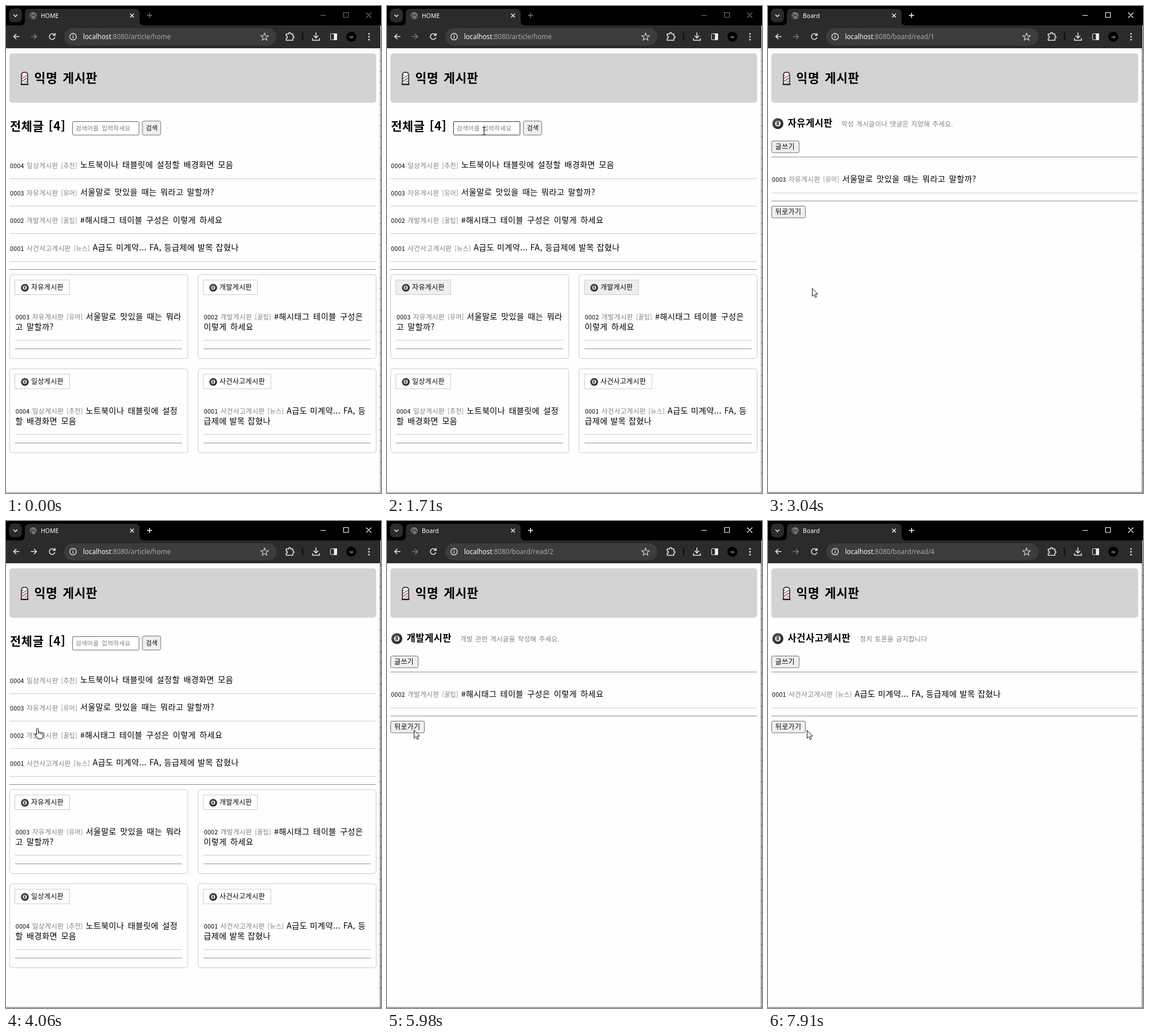
Write an HTML page that moves like this. It is 657 px wide and 853 px high and loops after 8000 ms.

```html
<!DOCTYPE html>
<html lang="ko">
<head>
<meta charset="utf-8">
<title>익명 게시판</title>
<style>
html, body { margin: 0; width: 100%; height: 100%; overflow: hidden; background: #fefefe; }
svg { display: block; width: 100vw; height: 100vh; }
text { font-family: "Noto Sans CJK KR", "Noto Sans CJK", sans-serif; font-weight: 350; letter-spacing: .03em; fill: #000; white-space: pre; }
.ui { font-family: "Noto Sans", "Open Sans", sans-serif; font-weight: 400; letter-spacing: 0; fill: #fff; }
.ico { fill: none; stroke: #e3e3e3; stroke-width: 1.6; }
.gray { fill: #808080; }
.bold { font-weight: 700; }
</style>
</head>
<body>
<svg id="stage" viewBox="0 0 657 853" preserveAspectRatio="none"></svg>
<script>
const LOOP = 8000;
const stage = document.getElementById('stage');

const text = (x, y, size, str, cls = '', ws = 0) =>
  `<text x="${x}" y="${y}" font-size="${size}" class="${cls}" word-spacing="${ws}">${str}</text>`;
const rect = (x, y, w, h, fill, stroke = 'none', r = 0, cls = '') =>
  `<rect x="${x}" y="${y}" width="${w}" height="${h}" rx="${r}" fill="${fill}" stroke="${stroke}" class="${cls}"/>`;
const circle = (x, y, r, fill, extra = '') => `<circle cx="${x}" cy="${y}" r="${r}" fill="${fill}" ${extra}/>`;
const path = (d, cls = 'ico', extra = '') => `<path d="${d}" class="${cls}" ${extra}/>`;
const rule = (x, y, w, color) => rect(x, y, w, 1, color);

const posts = {
  4: { board: '일상게시판', tag: '[추천]', title: '노트북이나 태블릿에 설정할 배경화면 모음', wrap: ['노트북이나 태블릿에 설정', '할 배경화면 모음'], ws: 2 },
  3: { board: '자유게시판', tag: '[유머]', title: '서울말로 맛있을 때는 뭐라고 말할까?', wrap: ['서울말로 맛있을 때는 뭐라', '고 말할까?'], ws: 2 },
  2: { board: '개발게시판', tag: '[꿀팁]', title: '#해시태그 테이블 구성은 이렇게 하세요', wrap: ['#해시태그 테이블 구성은', '이렇게 하세요'], ws: 2 },
  1: { board: '사건사고게시판', tag: '[뉴스]', title: 'A급도 미계약... FA, 등급제에 발목 잡혔나', wrap: ['A급도 미계약... FA, 등', '급제에 발목 잡혔나'], ws: 0.4 }
};

function postLine(x, y, id, wrapped) {
  const p = posts[id];
  const shift = p.board.length > 5 ? 22 : 0;
  const [first, second] = wrapped ? p.wrap : [p.title];
  return text(x, y, 10.6, '000' + id) +
    text(x + 29, y, 11.7, p.board, 'gray') +
    text(x + 89.5 + shift, y, 10.8, p.tag, 'gray') +
    text(x + 123 + shift, y - 0.6, 14.2, first, '', p.ws) +
    (second ? text(x - 0.5, y + 17.4, 14.2, second, '', p.ws) : '');
}

function ball(x, y, r) {
  return circle(x, y, r, '#2b2b2b') +
    circle(x - r * 0.1, y - r * 0.1, r * 0.78, '#484848') +
    circle(x, y, r * 0.5, '#f4f4f4') +
    `<text x="${x}" y="${y + r * 0.33}" font-size="${r * 0.9}" class="bold" text-anchor="middle">8</text>`;
}

function card(x, y, id, btnW, row) {
  const dx = x > 300 ? 9.5 : 9;
  return rect(x, y, 312, 147, 'none', '#ccc', 4) +
    rect(x + dx, y + 9.5, btnW, 25.5, '#fff', '#ccc', 0, 'link' + row) +
    ball(x + 26.5, y + 23, 6.8) +
    text(x + 37.5, y + 26.8, 12, posts[id].board) +
    postLine(x + 10.2, y + 78.8, id, true) +
    rule(x + dx, y + 114.5, 293, '#ccc') +
    rule(x + dx, y + 129.5, 293, '#969696');
}

const button = (x, y, w, h, label, size = 12) =>
  rect(x, y, w, h, '#efefef', '#707070', 2.5) + text(x + 6.3, y + h / 2 + 4.3, size, label);

function homePage() {
  let s = text(7, 218, 20.9, '전체글 [4]', 'bold', 1.4) +
    '<rect id="field" x="116.5" y="202.5" width="116.5" height="23.5" rx="1.5" fill="#fff"/>' +
    text(122, 217.8, 10.7, '검색어를 입력하세요', 'gray', 1.8) +
    button(239, 201.5, 32, 24.5, '검색', 10.8);
  [4, 3, 2, 1].forEach((id, i) => {
    const y = 283.6 + i * 48.4;
    s += postLine(7, y, id) + rule(6, Math.round(y + 18), 642, '#ccc');
  });
  return s + rule(6, 461, 642, '#8d8d8d') +
    card(6.5, 470.5, 3, 96, 1) + card(336.5, 470.5, 2, 94.5, 1) +
    card(6.5, 635.5, 4, 96, 2) + card(336.5, 635.5, 1, 118, 2);
}

function boardPage(id, note) {
  const name = posts[id].board;
  return ball(17.3, 206, 9.6) +
    text(34.5, 211, 16.6, name, 'bold') +
    text(name.length > 5 ? 161 : 128.5, 211, 11.5, note, 'gray', 0.8) +
    button(6.5, 236.5, 48, 20.5, '글쓰기') + rule(6, 264, 642, '#8d8d8d') +
    postLine(7, 308.4, id) + rule(6, 327, 642, '#ccc') + rule(6, 341, 642, '#8d8d8d') +
    button(6.5, 350.5, 59, 20.5, '뒤로가기');
}

function pole() {
  return '<clipPath id="glass"><path d="M28 121h9.500v13h-9.500z"/></clipPath>' +
    path('M27 137V121q0-5 5.500-5t5.500 5v16z', '', 'fill="#f7f7f7" stroke="#222" stroke-width="1.6"') +
    `<g clip-path="url(#glass)">${[0, 1, 2, 3].map(i =>
      path(`M26 ${123 + i * 5}l13 -8`, '', `stroke="${i % 2 ? '#e05050' : '#3562cf'}" stroke-width="1.5"`)).join('')}</g>` +
    rect(25.5, 136, 14, 2.5, '#222', 'none', 1);
}

function chrome() {
  const star = Array.from({ length: 10 }, (_, i) => {
    const a = i * Math.PI / 5 - Math.PI / 2, r = i % 2 ? 3 : 6.8;
    return (453 + r * Math.cos(a)).toFixed(1) + ' ' + (54.3 + r * Math.sin(a)).toFixed(1);
  }).join('L');
  return rect(0, 0, 657, 34, '#000') + rect(0, 34, 656, 40, '#2b2b2b') +
    rect(5, 4.5, 23, 24, '#2b2b2b', 'none', 8) + path('M13 15l3.500 3.500 3.500-3.500') +
    path('M25 34q8 0 8-8V13q0-8 8-8H226q8 0 8 8V26q0 8 8 8z', '', 'fill="#2b2b2b"') +
    circle(47.5, 17, 6.2, '#74777b') + path('M43 14q3 4 5 2t4 4M46 22q-2-3-4-4', '', 'fill="none" stroke="#333" stroke-width="1.5"') +
    '<text id="tab" class="ui" x="61" y="21.200" font-size="10.500"></text>' +
    path('M217.500 13.500l6.500 6.500M224 13.500l-6.500 6.500') +
    `<g id="controls" fill="none" stroke-width="1.1">${
      path('M247 16.500h9M251.500 12v9', '', 'stroke-width="1.5"') +
      path('M551 16.500h9.500M591.500 11.500h8.500v8.500h-8.500zM631 11.500l9 9M640 11.500l-9 9', '')}</g>` +
    path('M23.500 53.500H13.500M18 49l-4.500 4.500 4.500 4.500') +
    path('M43.500 53.500h10M49 49l4.500 4.500-4.500 4.500', 'ico', 'id="forward"') +
    path('M85 50.500a5 5 0 1 0 .8 4.500M86 47.500v4h-4') +
    rect(102, 39, 372, 30, '#3c3c3c', 'none', 15) +
    circle(117.5, 53.7, 5.7, 'none', 'stroke="#e3e3e3" stroke-width="1.4"') +
    path('M117.500 53v3.500M117.500 50.300v1.500') +
    '<text class="ui" x="135" y="58" font-size="11.700">localhost<tspan id="url" fill="#a8a8a8"></tspan></text>' +
    path(`M${star}Z`, 'ico', 'style="stroke-width:1.3;stroke:#c7c7c7"') +
    path('M491 49h4q0-2.500 2-2.500t2 2.500h3.500v3.500q2 0 2 2t-2 2v3.500h-11.500v-3.500q2 0 2-2t-2-2z') +
    rect(518.5, 47, 2, 13, '#0d0d0d') +
    path('M543 46.500v9M539 52l4 4 4-4M537 56.500v3.500h12v-3.500') +
    rect(568.5, 48.500, 11, 10.5, 'none', '#e3e3e3', 1) + rect(574.5, 48, 5.5, 11.5, '#f1f1f1') +
    circle(605, 53.8, 8.8, '#000') +
    '<text class="ui" x="605" y="56" font-size="5.500" font-style="italic" text-anchor="middle">rip</text>' +
    [49, 54, 59].map(y => circle(636, y, 1.4, '#e3e3e3')).join('') +
    rect(656, 40, 1, 813, '#e4e1d2') +
    path('M656.500 76V830', '', 'stroke="#6b664f" stroke-dasharray="2 17"') +
    path('M655.500 74V852M0 852H657', '', 'id="frame" fill="none"');
}

const cursors = {
  arrow: path('M.5.5V14.600L3.700 11.600 5.900 16.600 8.100 15.600 5.900 10.800H10.300Z', '', 'fill="#fff" stroke="#111"'),
  hand: path('M-1.500 13V2Q0-1 1.500 2V8Q3 6 4.500 8.300 6 7 7.300 9 9.600 8 10 10.500V14Q10 17 8 19.500H1Q-.5 16.500-3.800 13-4.300 10-1.500 12.500M1.500 8V11M4.500 8.300V11.500M7.300 9V12', '', 'fill="#fff" stroke="#111" stroke-linejoin="round"'),
  beam: path('M-3-6.500H-1Q0-6.500 0-5.500 0-6.500 1-6.500H3M0-5.500V5.500M-3 6.500H-1Q0 6.500 0 5.500 0 6.500 1 6.500H3', '', 'fill="none" stroke="#222" stroke-width="1.2"')
};

const pages = {
  home: { tab: 'HOME', url: ':8080/article/home', body: homePage() },
  free: { tab: 'Board', url: ':8080/board/read/1', body: boardPage(3, '악성 게시글이나 댓글은 지양해 주세요.') },
  dev: { tab: 'Board', url: ':8080/board/read/2', body: boardPage(2, '개발 관련 게시글을 작성해 주세요.') },
  news: { tab: 'Board', url: ':8080/board/read/4', body: boardPage(1, '정치 토론을 금지합니다') }
};

stage.innerHTML = rect(0, 0, 657, 853, '#fefefe') +
  rect(6, 83, 642.5, 86.5, '#d3d3d3', 'none', 5) + pole() +
  text(49.5, 134.2, 21.5, '익명 게시판', 'bold', 2.2) +
  Object.entries(pages).map(([k, p]) => `<g id="${k}">${p.body}</g>`).join('') + chrome() +
  `<g id="cursor">${Object.entries(cursors).map(([k, c]) => `<g id="${k}">${c}</g>`).join('')}</g>`;

// time, page
const visits = [[0, 'home'], [2840, 'free'], [3960, 'home'], [5070, 'dev'], [6080, 'home'], [7100, 'news']];
// time, steps of 100 ms, target x, target y
const moves = [
  [310, 4, 85, 441], [810, 4, 20, 502], [1210, 5, 170, 224], [1710, 1, 170, 218.5],
  [2130, 5, 81, 500], [2740, 1, 77, 494], [3560, 4, 53, 366], [4060, 1, 55, 362],
  [4160, 3, 34, 374], [4460, 4, 460, 524], [4970, 1, 400, 496], [5380, 6, 47, 366],
  [6280, 5, 456, 660], [7310, 7, 68, 366]
];

const $ = id => document.getElementById(id);
const show = (node, on) => { node.style.display = on ? '' : 'none'; };
const within = (x, y, l, t, r, b) => x >= l && x <= r && y >= t && y <= b;

function pointerAt(t) {
  let x = 500, y = -120;
  for (const [start, n, tx, ty] of moves) {
    if (t < start) break;
    const u = Math.min(n, Math.floor((t - start) / 100) + 1) / n;
    const e = (u + u * u * (3 - 2 * u)) / 2;
    x += (tx - x) * e;
    y += (ty - y) * e;
  }
  return [x, y];
}

function shapeAt(page, x, y) {
  if (page !== 'home') return 'arrow';
  if (within(x, y, 116, 202, 233, 227)) return 'beam';
  const links = [[6, 254, 405, 447], [15, 480, 112, 506], [346, 480, 441, 506], [15, 645, 112, 671], [346, 645, 464, 671]];
  return links.some(b => within(x, y, ...b)) ? 'hand' : 'arrow';
}

function draw(t) {
  const page = visits.filter(v => v[0] <= t).pop()[1];
  for (const k in pages) show($(k), k === page);
  $('tab').textContent = pages[page].tab;
  $('url').textContent = pages[page].url;
  const active = t >= 2740;
  $('controls').setAttribute('stroke', active ? '#fff' : '#777');
  $('frame').setAttribute('stroke', active ? '#555' : '#999');
  $('forward').style.stroke = page === 'home' && active ? '#e3e3e3' : '#777';
  const late = t >= 6280;
  const tint = (cls, on) => stage.querySelectorAll(cls).forEach(n => n.setAttribute('fill', on ? '#efefef' : '#fff'));
  tint('.link1', late || (t >= 810 && t < 2840));
  tint('.link2', late);

  const [x, y] = pointerAt(t);
  const shape = shapeAt(page, x, y);
  for (const k in cursors) show($(k), k === shape);
  show($('cursor'), t >= 310);
  $('cursor').setAttribute('transform', `translate(${Math.round(x)} ${Math.round(y)})`);
  $('field').setAttribute('stroke', shape === 'beam' ? '#333' : '#666');
}

const began = performance.now();
function tick() {
  draw((performance.now() - began) % LOOP);
  requestAnimationFrame(tick);
}
tick();
</script>
</body>
</html>
```
